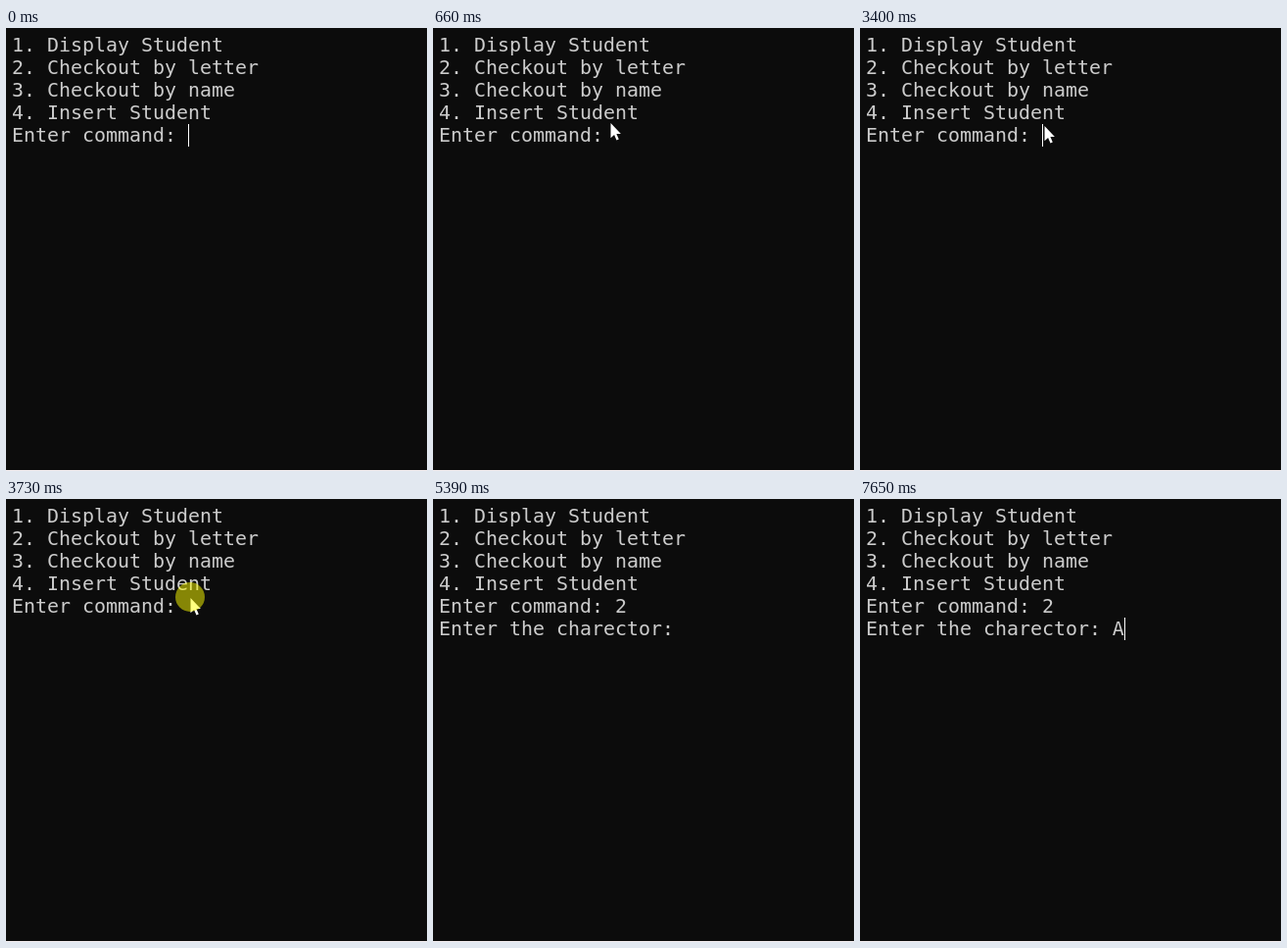
An HTML page with a canvas for the animation above (8000 ms loop, 430x452 px).

```html
<!DOCTYPE html>
<html lang="en">
<head>
<meta charset="utf-8">
<title>Student menu</title>
<style>
  html, body { margin: 0; width: 100%; height: 100%; overflow: hidden; background: #0c0c0c; }
  canvas { display: block; width: 430px; height: 452px; }
</style>
</head>
<body>
<canvas id="stage" width="430" height="452"></canvas>
<script>
const ctx = document.getElementById('stage').getContext('2d');
const LOOP = 8000, LEFT = 6, TOP = 6, CELL = 12, ROW = 23, BLINK = 530;
const CLICK = 3730, TYPED = 3860, ASKED = 4790, ANSWERED = 7650;
const MENU = ['1. Display Student', '2. Checkout by letter', '3. Checkout by name', '4. Insert Student'];

// Each state adds text at its time; blinking counts from its own start.
const STATES = [
  { at: 0, blinkFrom: -200, lines: ['Enter command: '] },
  { at: TYPED, blinkFrom: 4000, lines: ['Enter command: 2'] },
  { at: ASKED, blinkFrom: 4860, lines: ['Enter command: 2', 'Enter the charector: '] },
  { at: ANSWERED, blinkFrom: ANSWERED, lines: ['Enter command: 2', 'Enter the charector: A'] }
];

// The pointer enters, overshoots, settles, then nudges to the caret.
const ENTRY = { at: 260, x: 267, y: 238 };
const GLIDES = [
  { at: ENTRY.at, ms: 340, dx: -90, dy: -142 },
  { at: 600, ms: 60, dx: 3.5, dy: 0 },
  { at: 1120, ms: 130, dx: 7, dy: 3 },
  { at: 3400, ms: 130, dx: 0, dy: 1 }
];
const ARROW = new Path2D('M0 0V15.2L3.6 11.9 6 17.5 8.3 16.5 5.9 11H10.4Z');

const easeOut = p => 1 - (1 - p) ** 2;
const clamp = p => Math.min(1, Math.max(0, p));

function rect(x, y, w, h, color) {
  ctx.fillStyle = color;
  ctx.fillRect(x, y, w, h);
}

function drawLines(lines) {
  ctx.font = '19.93px "DejaVu Sans Mono", monospace';
  ctx.fillStyle = '#cccccc';
  lines.forEach((line, i) => ctx.fillText(line, LEFT, TOP + 18 + i * ROW));
}

function drawCaret(lines) {
  const row = lines.length - 1;
  rect(LEFT + lines[row].length * CELL, TOP + row * ROW, 1, ROW, '#ffffff');
}

function pointerAt(t) {
  let { x, y } = ENTRY;
  for (const g of GLIDES) {
    const p = easeOut(clamp((t - g.at) / g.ms));
    x += g.dx * p;
    y += g.dy * p;
  }
  return [x, y];
}

function drawPointer(t) {
  const [x, y] = pointerAt(t);
  ctx.save();
  ctx.translate(x + 1, y + 1);
  ctx.fillStyle = '#ffffff';
  ctx.fill(ARROW);
  ctx.restore();
  if (t >= CLICK) {
    ctx.beginPath();
    ctx.arc(x + 0.5, y, 15, 0, Math.PI * 2);
    ctx.fillStyle = 'rgba(255, 255, 0, 0.5)';
    ctx.fill();
  }
}

function draw(t) {
  const state = STATES.filter(s => s.at <= t).pop();
  const lines = [...MENU, ...state.lines];
  const lit = t < state.blinkFrom || Math.floor((t - state.blinkFrom) / BLINK) % 2 === 0;
  rect(0, 0, 430, 452, '#0c0c0c');
  rect(0, 451, 430, 1, '#f4eef0');
  drawLines(lines);
  if (lit) drawCaret(lines);
  if (t >= ENTRY.at && t < TYPED) drawPointer(t);
}

const start = performance.now();
function tick() {
  draw((performance.now() - start) % LOOP);
  requestAnimationFrame(tick);
}
tick();
</script>
</body>
</html>
```
